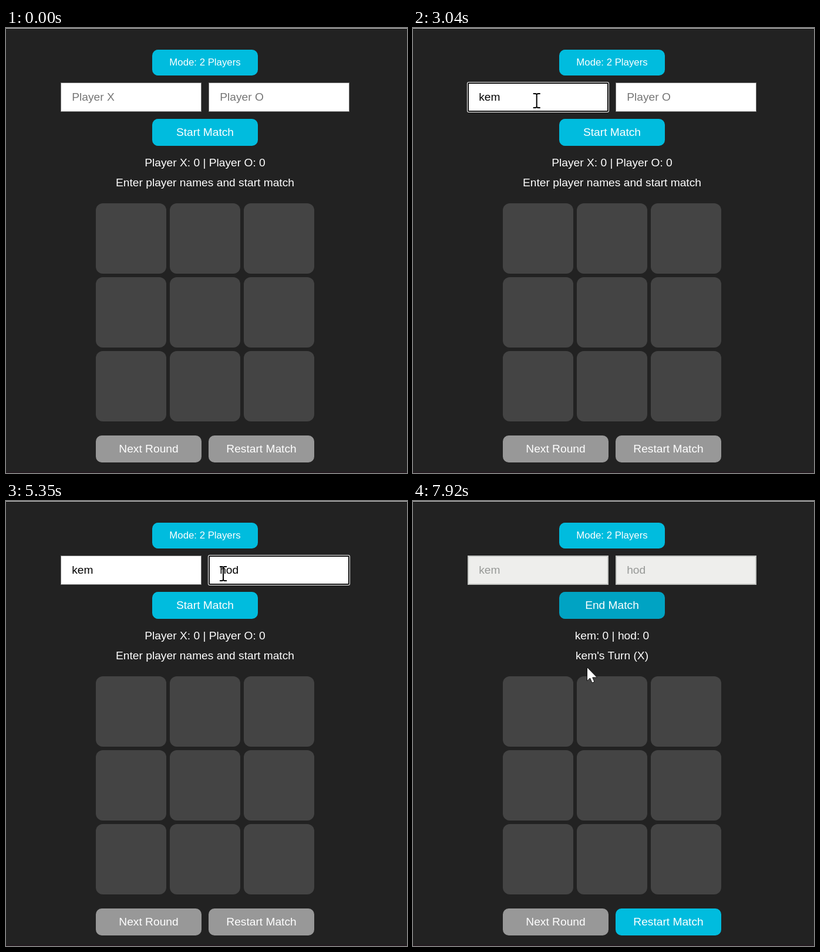
Write an HTML page that moves like this. It is 683x759 px and loops after 7990 ms.

```html
<!DOCTYPE html>
<html lang="en">
<head>
<meta charset="utf-8">
<title>Tic-tac-toe</title>
<style>
html, body { margin: 0; height: 100%; overflow: hidden; background: #222; }
svg { display: block; width: 683px; height: 759px; font: 19.2px "Liberation Sans", Arial, sans-serif; }
.mode { font-size: 16.8px; }
.item { font: 18.5px "Open Sans", sans-serif; }
</style>
</head>
<body>
<svg id="stage" viewBox="0 0 683 759"></svg>
<script>
const LOOP = 7990;
const stage = document.getElementById('stage');
const pen = document.createElement('canvas').getContext('2d');
pen.font = '19.2px "Liberation Sans", Arial, sans-serif';

const BLUE = [0, 188, 222], DARK = [0, 155, 187], GRAY = [152, 152, 152];
const PRESS = 7050, START = 7310;

// keys: [time, text]; popup: [show, fade start, fade end]
const fields = [
  { x: 93, hint: 'Player X', name: 'kem', focus: [1450, 3890], popup: [1520, 1910, 2110],
    keys: [[1450, ''], [1910, 'k'], [2110, 'ke'], [2510, 'kem']], items: () => ['kem'] },
  { x: 345, hint: 'Player O', name: 'hod', focus: [3890, PRESS], popup: [3890, 4820, 5020],
    keys: [[3890, ''], [4420, 'h'], [4620, 'ho'], [4820, 'hod']],
    items: t => t < 4420 ? ['hod', 'zhilo', 'yoa'] : ['hod'] }
];

// [start, end, steps, points]
const moves = [
  [260, 1040, 12, [[640, 790], [602, 735], [562, 665], [495, 560], [415, 434], [352, 305], [303, 209],
    [276, 163], [256, 126], [236, 76], [214, 92], [198, 118], [193, 124]]],
  [3040, 3670, 10, [[193, 124], [370, 124]]],
  [5550, 6030, 8, [[370, 124], [374, 169]]],
  [7850, 7920, 2, [[374, 169], [296, 283]]]
];

// [from, to, x, y]
const clicks = [[1450, 1710, 190, 123], [3890, 4090, 367, 123], [PRESS, START, 371, 168]];

const clamp = v => Math.max(0, Math.min(1, v));
const ramp = (t, a, b) => clamp((t - a) / (b - a));
const within = (t, [a, b]) => t >= a && t < b;
const mix = (a, b, p) => `rgb(${a.map((v, i) => Math.round(v + (b[i] - v) * p))})`;

const rect = (x, y, w, h, r, fill, more = '') =>
  `<rect x="${x}" y="${y}" width="${w}" height="${h}" rx="${r}" fill="${fill}" ${more}/>`;
const text = (x, y, s, fill = '#fff', more = '') => `<text x="${x}" y="${y}" fill="${fill}" ${more}>${s}</text>`;
const centered = (x, y, s, cls = '') => text(x, y, s, '#fff', `text-anchor="middle" class="${cls}"`);
const button = (x, y, h, label, fill, cls) =>
  rect(x, y, 180, h, 10, fill) + centered(x + 90, y + (cls ? 27 : 29), label, cls);

function drawField(f, t) {
  const typed = f.keys.filter(k => t >= k[0]).pop();
  const value = typed ? typed[1] : '';
  const left = f.x + 19.2;
  if (t >= START)
    return rect(f.x + 1, 94, 238, 48, 0, '#eeeeec', 'stroke="#c3c5c2" stroke-width="2"') +
      text(left, 124, f.name, '#969896');
  const focused = within(t, f.focus);
  let out = focused
    ? rect(f.x - 1, 92, 242, 52, 3, '#fff') + rect(f.x, 93, 240, 50, 2, '#101010') + rect(f.x + 2, 95, 236, 46, 0, '#fff')
    : rect(f.x + .5, 93.5, 239, 49, 0, '#fff', 'stroke="#767676"');
  out += value ? text(left, 124, value, '#000') : text(left, 124, f.hint, '#757575');
  if (focused && Math.floor((t - typed[0]) / 530) % 2 === 0)
    out += rect(Math.round(left + pen.measureText(value).width), 107, 2, 21, 0, '#000');
  return out;
}

function drawPopup(f, t) {
  const [show, fade, end] = f.popup;
  if (!within(t, [show, end])) return '';
  const x = f.x + 88, items = f.items(t);
  return `<g opacity="${1 - ramp(t, fade, end)}">` +
    rect(x, 156, 236, 12 + items.length * 54, 11, '#fff') +
    `<path d="M${x + 18} 157l14-14 14 14z" fill="#fff"/>` +
    items.map((s, i) => text(x + 18, 196.5 + i * 54, s, '#1c1f1a', 'class="item"')).join('') + '</g>';
}

function cursorAt(t) {
  const [a, b, n, pts] = moves.filter(m => t >= m[0]).pop() || [];
  if (!n) return null;
  const step = Math.min(n, 1 + Math.floor((t - a) / (b - a) * (n - 1) + 1e-6));
  const pos = step / n * (pts.length - 1);
  const i = Math.min(pts.length - 2, Math.floor(pos + 1e-6));
  return pts[i].map((v, k) => v + (pts[i + 1][k] - v) * (pos - i));
}

function drawCursor(t) {
  const p = cursorAt(t);
  if (!p) return '';
  const [x, y] = p;
  const inBox = (l, top, w, h) => x >= l && x < l + w && y >= top && y < top + h;
  const cell = inBox(153, 299, 372, 372) && (x - 153) % 126 < 120 && (y - 299) % 126 < 120;
  let shape;
  if (fields.some(f => inBox(f.x, 93, 240, 50)))
    shape = '<path d="M-6-12H-2L0-11 2-12H6M0-11V11M-6 12H-2L0 11 2 12H6" fill="none" stroke="#000" stroke-width="2"/>';
  else if (cell || inBox(249, 155, 180, 46) || inBox(249, 37, 180, 44))
    shape = '<path d="M-2 2Q-2 0 0 0T2.5 2V10Q4 8 6.5 10.5 9 9 10.500 12 14 11 14.500 14V21Q14 26 11 28V31H-1V28Q-6 22-8.500 18-9 15-6 15.500L-2 19Z" fill="#fff" stroke="#111" stroke-width="1.300"/>' +
      '<path d="M2.500 10V16M6.500 11V16M10.500 12V17" stroke="#111" stroke-width="1.200"/>';
  else
    shape = '<path d="M.5.5V24L5.500 19 9 27 13 25.500 9.800 18H17.500Z" fill="#fff" stroke="#111"/>';
  return `<g transform="translate(${x} ${y})">${shape}</g>`;
}

function render(t) {
  const on = t >= START;
  const hover = ramp(t, 5750, 6030) - ramp(t, 7850, 8150);
  let out = rect(0, 0, 683, 1, 0, '#d0d0d0') + rect(0, 757, 683, 2, 0, '#241a20');
  out += button(249, 37, 44, 'Mode: 2 Players', mix(BLUE, BLUE, 0), 'mode');
  out += fields.map(f => drawField(f, t)).join('');
  out += button(249, 155, 46, on ? 'End Match' : 'Start Match', mix(BLUE, DARK, hover));
  out += centered(339, 236, on ? 'kem: 0 | hod: 0' : 'Player X: 0 | Player O: 0');
  out += centered(339, 270, on ? "kem's Turn (X)" : 'Enter player names and start match');
  for (let i = 0; i < 9; i++)
    out += rect(153 + i % 3 * 126, 299 + Math.floor(i / 3) * 126, 120, 120, 12, '#444');
  out += button(153, 695, 46, 'Next Round', mix(GRAY, GRAY, 0));
  out += button(345, 695, 46, 'Restart Match', mix(GRAY, BLUE, ramp(t, START - 70, 7590)  * on));
  out += fields.map(f => drawPopup(f, t)).join('') + drawCursor(t);
  for (const [a, b, x, y] of clicks)
    if (within(t, [a, b])) out += `<circle cx="${x}" cy="${y}" r="18" fill="#ff0" fill-opacity=".5"/>`;
  return out;
}

function frame(now) {
  stage.innerHTML = render(now % LOOP);
  requestAnimationFrame(frame);
}
frame(0);
</script>
</body>
</html>
```
